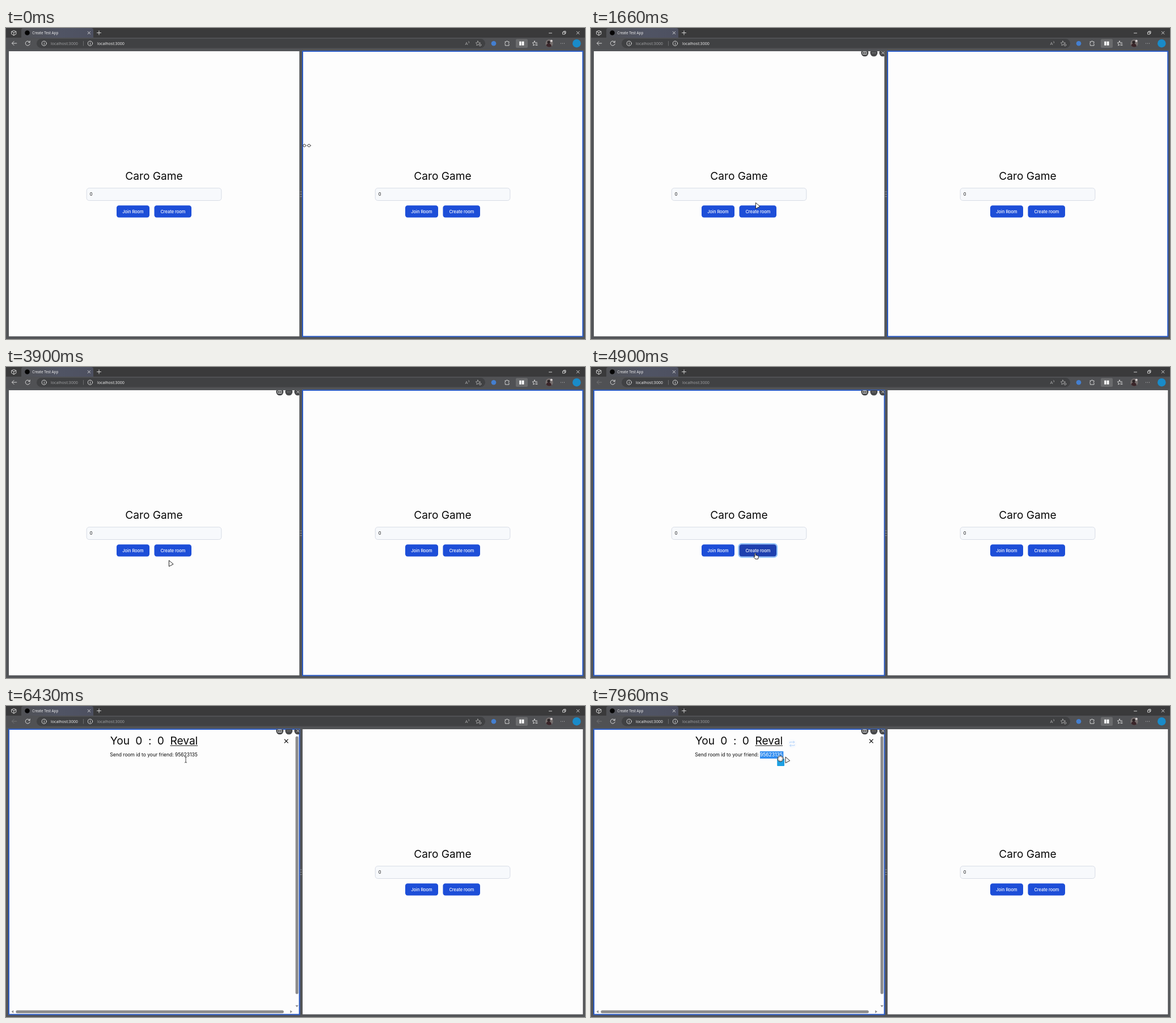
Write an HTML page that moves like this. It is 1021 by 549 pixels and loops after 8000 ms.

```html
<!DOCTYPE html>
<html lang="en">
<head>
<meta charset="utf-8">
<title>Two-pane game lobby</title>
<style>
  html, body { margin: 0; width: 100%; height: 100%; overflow: hidden; background: #535558; }
  svg { display: block; width: 100%; height: 100%; }
  .ui { font-family: "Open Sans", "Noto Sans", sans-serif; fill: #f4f4f4; }
  .page { font-family: Inter, sans-serif; fill: #080808; }
  .title { font-size: 19.15px; }
  .body { font-size: 8.5px; }
  .small { font-size: 7.45px; }
  .label { font-size: 7.45px; font-weight: 500; fill: #fff; text-anchor: middle; }
  .btn { fill: #1d4ed8; }
  .line { fill: none; stroke: #e4e4e4; stroke-width: .9; stroke-linecap: round; stroke-linejoin: round; }
  .focus { fill: none; stroke: #2c5cc5; stroke-width: 2; }
  .cursor { fill: #fff; stroke: #222; stroke-width: 1; stroke-linejoin: round; }
</style>
</head>
<body>
<svg viewBox="0 0 1021 549" preserveAspectRatio="none">
  <defs>
    <linearGradient id="tabFill">
      <stop offset="0" stop-color="#505155"/>
      <stop offset=".55" stop-color="#505464"/>
      <stop offset="1" stop-color="#4d5060"/>
    </linearGradient>
    <clipPath id="leftClip"><rect x="5" y="41" width="512.5" height="503"/></clipPath>
    <clipPath id="avatarClip"><circle cx="958" cy="27" r="6.7"/></clipPath>
    <g id="info" class="line"><circle r="4.1"/><path d="M0-.4V2M0-2.1V-2"/></g>
    <g id="heading" class="page">
      <text class="title" x="261" y="268" text-anchor="middle">Caro Game</text>
      <rect x="142.2" y="282.7" width="237.6" height="21.8" rx="4.3" fill="#f7f9fc" stroke="#cfd5df" stroke-width=".8"/>
      <text class="small" x="147.8" y="296.4">0</text>
      <rect class="btn" x="195" y="313.3" width="58" height="21.2" rx="4.2"/>
      <text class="label" x="224" y="326.6">Join Room</text>
    </g>
    <text id="createLabel" class="page label" x="294.4" y="326.6">Create room</text>
    <path id="arrow" class="cursor" d="M.4.4L8 7 .4 11Z"/>
  </defs>

  <!-- Tab strip -->
  <rect width="1021" height="17" fill="#3a3a3b"/>
  <path d="M27 17V4Q27 0 31 0H150Q154 0 154 4V17Z" fill="url(#tabFill)"/>
  <g class="line">
    <path d="M10 6.3L13.8 4.5 17.8 6.3V10.8L13.8 13 10 10.8ZM10 6.3L13.8 8.3V13M13.8 8.3L17.8 6.3"/>
    <path d="M144.2 6.4L148.6 10.8M148.6 6.4L144.2 10.8M160.5 8.5H167.5M164 5V12"/>
    <path d="M957.5 9H962.5M982 7.2H985.7V11H982ZM983.4 7V5.8H987V9.5H985.9M1006.3 6.2L1011 10.9M1011 6.2L1006.3 10.9"/>
  </g>
  <circle cx="37.5" cy="8.5" r="4.3" fill="#050505"/>
  <text class="ui" x="46.3" y="10.9" font-size="6.3">Create Test App</text>

  <!-- Toolbar -->
  <rect y="17" width="1021" height="21" fill="#505154"/>
  <rect x="54" y="19" width="791" height="16.5" rx="8.2" fill="#404143"/>
  <path id="back" class="line" d="M18.8 27H10.7M14 23.5L10.5 27 14 30.5"/>
  <path class="line" d="M41.8 25.1A4 4 0 1 0 42.2 28M42.2 22.8V25.4H39.5"/>
  <use href="#info" x="67.3" y="27.2"/>
  <use href="#info" x="148.5" y="27.2"/>
  <path d="M136.5 23V31.5" stroke="#77787a" stroke-width=".8"/>
  <g class="ui" font-size="7.1">
    <text id="leftUrl" x="79" y="29.8">localhost:3000</text>
    <text id="rightUrl" x="161" y="29.8">localhost:3000</text>
    <text x="809.5" y="30" font-size="8" fill="#aaa">A</text>
  </g>
  <g class="line">
    <path stroke="#aaa" d="M815.8 23.5Q817.4 24.7 816.2 26.5M832 23L833.4 25.7 836.5 26.1 834.2 28.2 830 31 830.4 28.2 828.3 26.1 831 25.7Z"/>
    <circle cx="836" cy="30" r="1.8" stroke="#aaa"/>
    <path d="M880.3 24.2H882.3Q882.8 22.2 884.2 23.2L884.6 24.2H887V26.4Q884.9 27.3 887 28.5V31H880.3V28.7Q878.7 27.5 880.3 26.4Z"/>
    <path d="M932 23L933 25.8H936.5M932 23L930.9 25.8 928.3 26 930.3 28 929.8 31 932.2 29.6M934 28.2H937M934 30.5H937"/>
  </g>
  <circle cx="860" cy="27.2" r="4.3" fill="#447fd0"/>
  <rect x="899" y="19.5" width="21" height="15.5" rx="2" fill="#6a6b6d"/>
  <path d="M905.2 23.8H908.8V30.7H905.2ZM909.8 23.8H913.4V30.7H909.8Z" fill="#fff"/>
  <g clip-path="url(#avatarClip)">
    <rect x="951" y="20" width="14" height="14" fill="#77706f"/>
    <circle cx="957" cy="25" r="2.6" fill="#2b2325"/>
    <ellipse cx="957" cy="33" rx="5" ry="6" fill="#3a2529"/>
  </g>
  <circle cx="961.8" cy="22.8" r="2" fill="#d8d2d2"/>
  <path d="M978.6 27.2H978.7M981.5 27.2H981.6M984.4 27.2H984.5" class="line" stroke-width="1.3"/>
  <circle cx="1006.3" cy="27.2" r="7.3" fill="#198bc9"/>

  <!-- Panes -->
  <rect x="5" y="41" width="512.3" height="503.3" fill="#fdfdfd"/>
  <rect x="523" y="41" width="494.3" height="503.3" fill="#fdfdfd"/>
  <path d="M519.1 289V289.1M521 289V289.1M519.1 293.3V293.4M521 293.3V293.4M519.1 297.6V297.7M521 297.6V297.7" class="line" stroke="#999"/>
  <g transform="translate(509)">
    <use href="#heading"/>
    <rect class="btn" x="261.5" y="313.3" width="65.5" height="21.2" rx="4.2"/>
    <use href="#createLabel"/>
  </g>
  <g id="lobby">
    <use href="#heading"/>
    <rect id="ring" x="260.4" y="312.2" width="67.7" height="23.4" rx="5.3" fill="none" stroke="#93c5fd" stroke-width="2.2"/>
    <rect id="create" x="261.5" y="313.3" width="65.5" height="21.2" rx="4.2"/>
    <use href="#createLabel"/>
  </g>
  <g id="room" class="page">
    <g class="title">
      <text x="183.8" y="68">You</text>
      <text x="228.2" y="68">0</text>
      <text x="251" y="68">:</text>
      <text x="266.8" y="68">0</text>
      <text x="289.4" y="68">Reval</text>
    </g>
    <path d="M289.5 70H338" stroke="#080808" stroke-width="1.1"/>
    <rect id="selection" x="298" y="80" width="41.3" height="12.8" fill="#2f8cf0"/>
    <text class="body" x="183.3" y="89.4">Send room id to your friend:</text>
    <text id="roomId" class="body" x="298" y="89.4">95623135</text>
    <path d="M490.9 58.7L497.5 65.3M497.5 58.7L490.9 65.3" stroke="#080808" stroke-width="1.2"/>
    <g fill="#8b8b8b">
      <rect x="510.5" y="53.5" width="5" height="455" rx="2.5"/>
      <rect x="17.3" y="537.2" width="472.5" height="5" rx="2.5"/>
      <path d="M510.4 528.2H515.6L513 531.8ZM13.2 537V542.2L9.6 539.6ZM501.2 537V542.2L504.8 539.6Z"/>
    </g>
    <g id="repeatIcon">
      <circle cx="354.7" cy="66.7" r="8" fill="#f8fafd"/>
      <path d="M350.5 65V63.8H358.4M357 62L358.8 63.8 357 65.4M358.8 68.5V69.8H351M352.5 68L350.6 69.8 352.5 71.5" class="line" style="stroke:#a9cdfa"/>
    </g>
    <rect id="popup" x="328.2" y="93.3" width="12.8" height="12.8" rx="1" fill="#1ea0e2"/>
  </g>
  <rect id="leftFocus" class="focus" x="5" y="41" width="512.5" height="503.6"/>
  <rect id="rightFocus" class="focus" x="523" y="41" width="494.2" height="503.6"/>
  <g id="paneTools" clip-path="url(#leftClip)">
    <g fill="#48494b"><circle cx="482.8" cy="43.8" r="6.5"/><circle cx="498.8" cy="43.8" r="6.5"/><circle cx="514.8" cy="43.8" r="6.5"/></g>
    <path class="line" d="M479.8 41.8H485.8V46.4H479.8ZM482.8 41.8V46.4M496.4 44H496.5M498.8 44H498.9M501.2 44H501.3M512.7 41.7L516.9 45.9M516.9 41.7L512.7 45.9"/>
  </g>

  <!-- Cursor shapes; the origin is the hot spot -->
  <g id="cursor">
    <path data-kind="resize" class="cursor" d="M-8 .5L-4.7-2-1.4.5-4.7 3ZM0 .5L3.3-2 6.6.5 3.3 3Z"/>
    <use data-kind="arrow" href="#arrow"/>
    <path data-kind="hand" class="cursor" d="M.8 6V1Q1.7-.3 2.6 1V4.3L6.3 5.2Q7.6 5.6 7.3 7.2L6.5 11H2L-1.2 7.2Q-1 5.7.8 7Z"/>
    <path data-kind="text" d="M-2-5Q0-5 0-3.8 0-5 2-5M0-4V4M-2 5Q0 5 0 3.8 0 5 2 5" fill="none" stroke="#333" stroke-width=".9"/>
    <g data-kind="busy">
      <use href="#arrow"/>
      <circle class="cursor" cx="-8.6" cy="3.6" r="5"/>
      <circle cx="-8.6" cy="3.6" r="3.4" fill="none" stroke="#777" stroke-width=".8" stroke-dasharray="4 1.3"/>
    </g>
  </g>
</svg>
<script>
const LOOP = 8000;
const el = id => document.getElementById(id);
const show = (node, on) => { node.style.display = on ? "" : "none"; };
const shapes = [...document.querySelectorAll("[data-kind]")];

// Pointer stops: time, x, y, shape
const stops = [
  [0, 531, 207, "resize"], [160, 500, 215, "arrow"],
  [700, 430, 250, "arrow"], [730, 405, 262, "arrow"],
  [1500, 345, 292, "text"], [1580, 312, 300, "text"], [1660, 290, 308, "arrow"],
  [2560, 289, 321, "hand"],
  [2800, 345, 325, "arrow"], [2830, 425, 328, "arrow"], [2860, 467, 329, "arrow"],
  [3300, 390, 328, "arrow"], [3330, 332, 324, "arrow"], [3660, 300, 323, "hand"],
  [3830, 293, 331, "hand"], [3860, 288, 338, "arrow"], [3900, 287, 341, "arrow"],
  [4360, 288, 333, "hand"], [4400, 288, 328, "hand"],
  [4930, 288, 328, "arrow"],
  [5360, 291, 270, "arrow"], [5400, 298, 190, "arrow"],
  [5900, 308, 130, "arrow"], [5930, 314, 106, "arrow"],
  [6430, 317, 95, "text"], [6520, 320, 90, "text"], [6760, 325, 91, "text"],
  [7430, 331, 92, "text"], [7730, 336, 91, "arrow"], [7860, 342.6, 89.5, "busy"]
];

function render(t) {
  const [, x, y, kind] = stops.findLast(stop => stop[0] <= t);
  el("cursor").setAttribute("transform", `translate(${x} ${y})`);
  shapes.forEach(shape => show(shape, shape.dataset.kind === kind));

  const leftActive = t >= 4730, inRoom = t >= 4930, selected = t >= 6600;
  show(el("leftFocus"), leftActive);
  show(el("rightFocus"), !leftActive);
  el("leftUrl").style.fill = leftActive ? "#f4f4f4" : "#a3a4a6";
  el("rightUrl").style.fill = leftActive ? "#a3a4a6" : "#f4f4f4";
  el("back").style.stroke = leftActive ? "#77787a" : "#e4e4e4";
  show(el("paneTools"), t >= 160);

  show(el("lobby"), !inRoom);
  show(el("ring"), t >= 4800);
  el("create").style.fill = kind === "hand" ? "#1e40af" : "#1d4ed8";

  show(el("room"), inRoom);
  show(el("selection"), selected);
  el("roomId").style.fill = selected ? "#fff" : "#080808";
  show(el("popup"), t >= 6760);
  show(el("repeatIcon"), t >= 7100);
}

function frame() {
  render(performance.now() % LOOP);
  requestAnimationFrame(frame);
}
frame();
</script>
</body>
</html>
```
